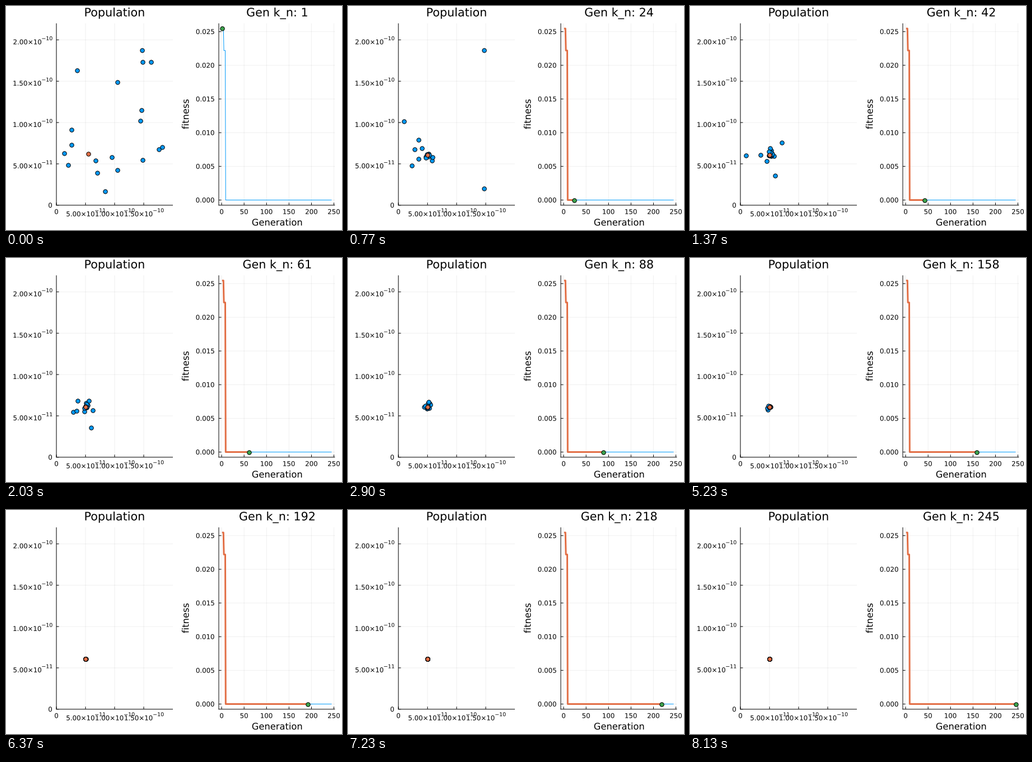
Animation, 600 px wide and 400 px high, one loop 8160 ms. Source, as a matplotlib script:

```python
import numpy as np
import matplotlib.pyplot as plt
from matplotlib.animation import FuncAnimation
from matplotlib.patches import PathPatch
from matplotlib.textpath import TextPath
from matplotlib.transforms import Affine2D

W, H, DPI = 600, 400, 100
GENS, LOOP_MS = 245, 8160
PX = 72 / DPI                      # points per pixel
BLUE, ORANGE, GREEN = "#009AFA", "#E26F46", "#3DA44D"
TITLE, GUIDE, TICK = 20.7, 16.3, 11.83
TOP, BOTTOM = 31, 355.7
GOAL = np.array([142.1, 265.7])

plt.rcParams["font.family"] = "DejaVu Sans"
plt.rcParams["toolbar"] = "None"

fig = plt.figure(figsize=(W / DPI, H / DPI), dpi=DPI, facecolor="white")
ax = fig.add_axes([0, 0, 1, 1])
ax.set_xlim(0, W)
ax.set_ylim(H, 0)
ax.axis("off")


def glyphs(x, y, text, size, align=0.5, angle=0):
    """Text outline on baseline y; align 0 is left, 1 is right."""
    path = TextPath((0, 0), text, size=size)
    box = path.get_extents()
    shift = -(box.x0 + align * box.width)
    place = (Affine2D().translate(shift, 0).scale(1, -1)
             .rotate_deg(-angle).translate(x, y))
    return place.transform_path(path)


def label(*args, **kw):
    return ax.add_patch(PathPatch(glyphs(*args, **kw), fc="black", lw=0))


def power(x, y, base, exp, align):
    """Scientific number with a raised exponent."""
    base_w, exp_w = 4.336 * TICK, 2.0 * 0.8 * TICK
    x -= align * (base_w + exp_w)
    label(x + 0.11 * TICK, y, base + "×10", TICK, 0)
    label(x + base_w + 0.08 * TICK, y - 7.3, exp, TICK * 0.8, 0)


def line(xs, ys, color="black", width=1.0, **kw):
    return ax.plot(xs, ys, color=color, lw=width * PX, snap=False,
                   solid_capstyle="butt", **kw)[0]


def panel(left, right, xticks, yticks):
    for x in xticks:
        line([x, x], [TOP, BOTTOM], alpha=0.06, zorder=1)
        line([x, x], [BOTTOM, BOTTOM - 4.5], zorder=2)
    for y in yticks:
        line([left, right], [y, y], alpha=0.06, zorder=1)
        line([left, left + 4.5], [y, y], zorder=2)
    line([left, left], [TOP, BOTTOM + 0.5], zorder=2)
    line([left - 0.5, right], [BOTTOM, BOTTOM], zorder=2)


def dots(color, z):
    return ax.scatter([], [], s=(7.4 * PX) ** 2, fc=color, ec="black",
                      lw=PX, zorder=z)


# Population panel
L0, R0 = 90, 298
px = L0 + 52 * np.arange(4)
py = BOTTOM - 73.8 * np.arange(5)
panel(L0, R0, px, py)
label(194, 18.5, "Population", TITLE)
label(L0, 371.5, "0", TICK)
label(82, BOTTOM + 4.3, "0", TICK, 1)
for i in range(1, 5):
    mantissa, exp = f"{i * 0.5e-10:.2e}".split("e-")
    power(82.3, py[i] + 7.9, mantissa, "−" + exp, 1)
    if i < 4:
        power(px[i], 375.5, mantissa, "−" + exp, 0.5)

# Fitness panel
L1, R1 = 380, 587.4
STEP = (R1 - L1) / (244 * 1.06)


def gen_x(g):
    return L1 + (6.32 + g) * STEP


def fit_y(f):
    return 346.5 - f * 12030


gx = gen_x(np.arange(0, 251, 50))
fy = fit_y(np.arange(6) * 0.005)
panel(L1, R1, gx, fy)
for i, x in enumerate(gx):
    label(x, 371.5, str(50 * i), TICK)
for i, y in enumerate(fy):
    label(371.7, y + 4.3, f"{0.005 * i:.3f}", TICK, 1)
label(484, 392, "Generation", GUIDE)
label(326.3, 193.3, "fitness", GUIDE, angle=90)
title = label(484, 18.5, "Gen k_n: 1", TITLE)

gens = np.arange(1, GENS + 1)
fitness = np.select([gens < 5, gens < 9], [0.02546, 0.0222], 0.0)
curve = np.column_stack([gen_x(gens), fit_y(fitness)])
line(*curve.T, BLUE, 1.0, zorder=3)
trace = line([], [], ORANGE, 3.0, zorder=4)
swarm = dots(BLUE, 5)
best = dots(ORANGE, 6)
cursor = dots(GREEN, 6)

# The elite closes in on the goal as its fitness drops
elite = GOAL + np.outer(fitness / fitness[0], (5, -1.6))

# First generation
start = [(104, 263), (110.5, 284), (116.5, 221), (116.5, 247.5),
         (127, 114.5), (159.5, 275.5), (162.5, 298), (176.5, 331),
         (189, 269.5), (198.5, 293), (199, 135.5), (240, 204.5),
         (242, 185.5), (242.5, 78.5), (244, 100), (244, 274.5),
         (259, 100), (273, 255.5), (279, 252)]


def evolve(pop, rng):
    """Replace some members each generation; the spread shrinks to zero."""
    pop = np.array(pop)
    n = len(pop)
    history = [pop.copy()]
    for g in gens[1:]:
        spread = 75 * np.exp(-g / 24) + 13 * max(0, 1 - g / 185)
        reach = spread * rng.random((n, 1)) ** 2
        child = GOAL + reach * rng.normal(size=(n, 2))
        fresh = rng.random(n) < 0.15
        pop[fresh] = np.clip(child[fresh], (100, 40), (290, 345))
        history.append(pop.copy())
    return history


history = evolve(start, np.random.default_rng(7))


def update(i):
    title.set_path(glyphs(484, 18.5, f"Gen k_n: {i + 1}", TITLE))
    swarm.set_offsets(history[i])
    best.set_offsets(elite[i])
    trace.set_data(*curve[:i + 1].T)
    cursor.set_offsets(curve[i])
    return title, swarm, best, trace, cursor


anim = FuncAnimation(fig, update, frames=GENS, interval=LOOP_MS / GENS,
                     repeat=True, repeat_delay=0, blit=False)
plt.show()
```
